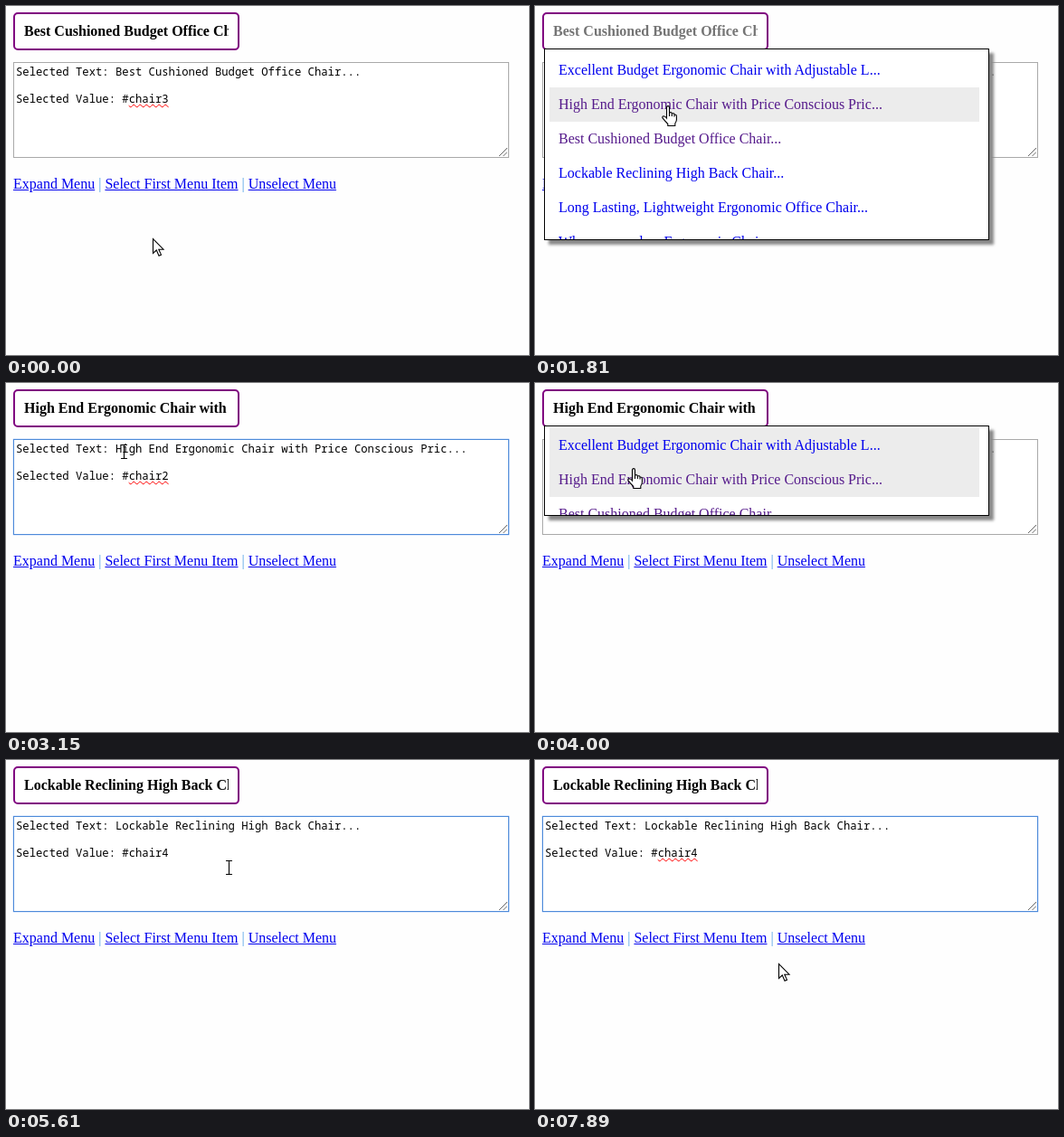
These frames come from a looping animation (578 by 386 pixels, 8 s). An HTML page:

```html
<!DOCTYPE html>
<html lang="en">
<head>
<meta charset="utf-8">
<title>Select menu</title>
<style>
html, body { margin: 0; width: 100%; height: 100%; overflow: hidden; background: #fefefe; }
#stage { position: relative; width: 578px; height: 386px; overflow: hidden; background: #fefefe;
  font: 16px "Liberation Serif", "Times New Roman", serif; }
#stage > * { position: absolute; box-sizing: border-box; white-space: pre; }
#button { left: 8px; top: 7px; width: 250px; height: 42px; padding: 0 10px;
  border: 2px solid purple; border-radius: 5px; background: #fff; }
#title { overflow: hidden; line-height: 38px; font-weight: bold; color: #000; }
#area { left: 8px; top: 62px; width: 548px; height: 106px; padding: 2px;
  border: 1px solid #a9a9a9; background: #fff; color: #000;
  font: 12.22px/15px "Noto Sans Mono", "DejaVu Sans Mono", monospace; }
#area.focus { border-color: #4d8ad8; box-shadow: 0 0 1px #4d90fe; }
#area svg { position: absolute; right: 1px; bottom: 1px; }
#mark { background: #3390ff; color: #fff; font-weight: 600; }
#area b { font-weight: normal; }
#area b.typo { text-decoration: underline wavy #f00 1px; text-underline-offset: 1px; text-decoration-skip-ink: none; }
#links { left: 8px; top: 188px; line-height: 18px; color: #4f9fe6; }
#links u { color: #00e; }
#menu { left: 10px; top: 47px; width: 492px; overflow: hidden;
  border: 1px solid #000; background: #fff; box-shadow: 5px 5px 3px #888; }
#list { position: absolute; left: 5px; width: 475px; }
#list div { height: 38px; padding-left: 10px; line-height: 38px; color: #00e; }
#list .seen { color: #551a8b; }
#list .lit { background: #ececec; }
#pointer { left: 0; top: 0; width: 20px; height: 25px; overflow: visible; }
#pointer path { stroke: #000; stroke-width: 1.1; fill: #fff; }
</style>
</head>
<body>
<div id="stage">
  <div id="button"><div id="title"></div></div>
  <div id="area"><span id="plain"></span><span id="mark"></span>

Selected Value: #<b id="value"></b><svg width="9" height="9" fill="none" stroke="#666"><path d="M0 9L9 0M4.5 9L9 4.5"/></svg></div>
  <div id="links"><u>Expand Menu</u> | <u>Select First Menu Item</u> | <u>Unselect Menu</u></div>
  <div id="menu"><div id="list"></div></div>
  <svg id="pointer"><path/></svg>
</div>
<script>
const $ = id => document.getElementById(id);
const LOOP = 8000, SLIDE = 400, FADE = 275, ROW = 38, CHAR = 7.33;
const PICKS = [1680, 4612], OPENS = [797, 3837];

const items = [
  "Excellent Budget Ergonomic Chair with Adjustable L...",
  "High End Ergonomic Chair with Price Conscious Pric...",
  "Best Cushioned Budget Office Chair...",
  "Lockable Reclining High Back Chair...",
  "Long Lasting, Lightweight Ergonomic Office Chair...",
  "Why you need an Ergonomic Chair...",
  "Our Ergonomic Seat Care Tips, Easy Ones for..."
];
const choices = [2, 1, 3];

const ticks = [0, 300, 430, 570, 700, 840, 970, 1110, 1260, 1380,
  1810, 1950, 2090, 2240, 2370, 2490, 2620, 2750,
  2870, 3010, 3150, 3300, 3440, 3580,
  3850, 4000, 4130, 4260, 4400, 4530, 4660, 4790,
  4910, 5050, 5190, 5330, 5480, 5620, 5760,
  6010, 6140, 6270, 6410, 6540, 6670, 6810, 6960,
  7110, 7240, 7370, 7500, 7630, 7760, 7890];

const shapes = {
  arrow: { x: 0, y: 0, d: "M.5 .5V16.5L4.3 13L7 19.2L9.5 18.1L6.8 12.2H12Z" },
  beam: { x: 3.5, y: 8, d: "M0 .5H3L3.5 1L4 .5H7M3.5 1V15M0 15.5H3L3.5 15L4 15.5H7" },
  hand: { x: 7, y: 0, d: "M5.5 14V2.3Q5.5 .6 7 .6Q8.5 .6 8.5 2.3V8Q11 7 11.3 9Q13.7 8.2 14 10" +
    "Q16.4 9.6 16.4 12V16Q16 18.5 14.8 20V22.5H6.8V20.5Q4 17.5 .8 13.6Q.6 12 2 11.7Q4 11.8 5.5 14Z" +
    "M8.5 8V12M11.3 9V12M14 10V12.5" }
};

// Pointer path: time, x, y, shape from then on.
const path = [
  [0, 162, 257, "arrow"], [170, 162, 257, "arrow"], [450, 156, 165, "beam"],
  [690, 155, 26, "hand"], [970, 154, 18, "hand"], [1110, 154, 18, "hand"],
  [1260, 150, 75, "hand"], [1380, 147, 110, "hand"], [2240, 147, 110, "hand"],
  [2370, 148, 110, "beam"], [2870, 146, 105, "beam"], [3440, 114, 45, "hand"],
  [3580, 112, 39, "hand"], [3850, 112, 39, "hand"], [4000, 109, 94, "hand"],
  [4400, 99, 180, "hand"], [5050, 98, 180, "hand"], [5300, 150, 150, "beam"],
  [5760, 397, 70, "beam"], [6140, 397, 68, "beam"], [6410, 350, 73, "beam"],
  [6670, 268, 77, "beam"], [6810, 215, 78, "beam"], [6960, 150, 78, "beam"],
  [7240, 15, 78, "beam"], [7370, 60, 110, "beam"], [7570, 185, 172, "arrow"],
  [7760, 262, 220, "arrow"], [7890, 269, 225, "arrow"]
];

const clamp = p => Math.min(1, Math.max(0, p));
const swing = p => 0.5 - Math.cos(Math.PI * clamp(p)) / 2;
const picksBefore = t => PICKS.filter(p => t >= p).length;

function pointerAt(time) {
  const t = Math.max(0, time);
  const i = path.findLastIndex(k => k[0] <= t);
  const a = path[i], b = path[i + 1] || a;
  const p = b === a ? 0 : (t - a[0]) / (b[0] - a[0]);
  return { x: a[1] + (b[1] - a[1]) * p, y: a[2] + (b[2] - a[2]) * p, shape: shapes[a[3]] };
}

const rows = items.map(text => {
  const row = document.createElement("div");
  row.textContent = text;
  $("list").append(row);
  return row;
});

function drawMenu(t, picked) {
  const open = OPENS.reduce((sum, o, i) =>
    sum + swing((t - o) / SLIDE) - swing((t - PICKS[i]) / SLIDE), 0);
  const top = Math.round(5 * open);
  $("menu").style.display = open > 0.002 ? "" : "none";
  $("menu").style.height = 2 + Math.round(276 * open) + "px";
  $("list").style.top = top + "px";

  // The hover highlight trails the pointer slightly.
  const hover = Math.floor((pointerAt(t - 50).y - 48 - top) / ROW);
  const seen = choices.slice(0, picked + 1);
  rows.forEach((row, i) => {
    row.classList.toggle("lit", i === hover || i === choices[picked]);
    row.classList.toggle("seen", seen.includes(i));
  });
}

function drawTitle(t, picked) {
  const since = picked ? t - PICKS[picked - 1] : LOOP;
  const fading = since < FADE;
  $("title").textContent = items[choices[fading ? picked - 1 : picked]];
  $("title").style.opacity = fading ? 1 - swing(since / FADE) : swing(since / FADE - 1);
}

function drawArea(t, picked) {
  const since = picked ? t - PICKS[picked - 1] : LOOP;
  const line = "Selected Text: " + items[choices[picked]];
  const dragging = t > 6100 && t < 7450;
  const start = dragging ? Math.max(0, Math.round((pointerAt(t - 120).x - 11) / CHAR)) : line.length;
  $("plain").textContent = line.slice(0, start);
  $("mark").textContent = line.slice(start);
  $("value").textContent = "chair" + (choices[picked] + 1);
  $("value").classList.toggle("typo", since > 1300);
  $("area").classList.toggle("focus", picked > 0 && since > 570 && !(picked === 1 && t > OPENS[1]));
}

function drawPointer(t) {
  const { x, y, shape } = pointerAt(t);
  $("pointer").firstElementChild.setAttribute("d", shape.d);
  $("pointer").style.transform =
    `translate(${Math.round(x - shape.x)}px, ${Math.round(y - shape.y)}px)`;
}

function draw(now) {
  const time = Math.max(0, now) % LOOP;
  const t = ticks.findLast(k => k <= time);
  const picked = picksBefore(t);
  drawMenu(t, picked);
  drawTitle(t, picked);
  drawArea(t, picked);
  drawPointer(t);
}

const begin = performance.now();
function loop() {
  draw(performance.now() - begin);
  requestAnimationFrame(loop);
}
loop();
</script>
</body>
</html>
```
